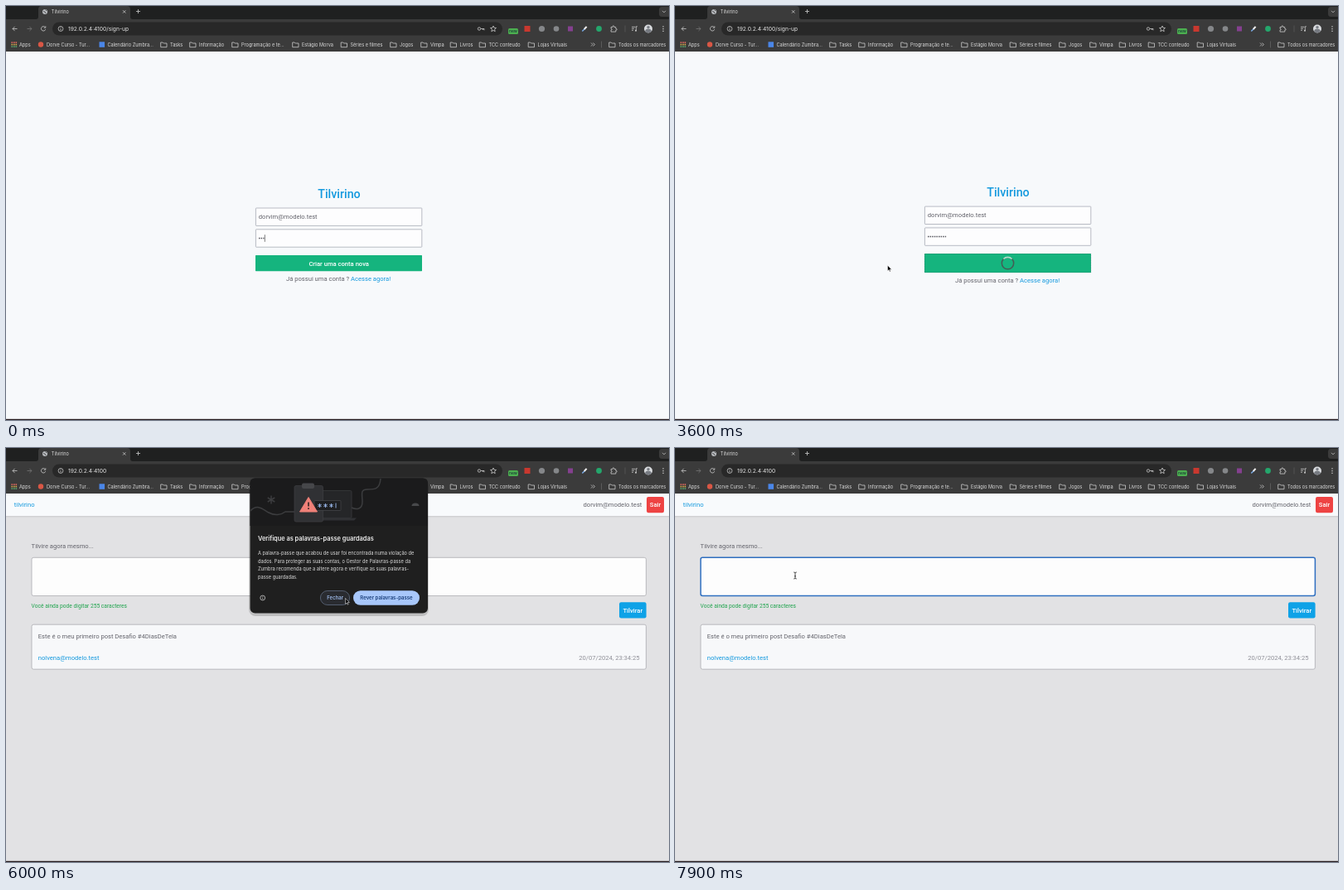
Write an HTML page that moves like this. It is 800 by 500 pixels and loops after 8 s.

```html
<!DOCTYPE html>
<html lang="pt">
<head>
<meta charset="utf-8">
<title>Tilvirino</title>
<style>
  html, body { margin: 0; width: 100%; height: 100%; overflow: hidden; background: #1f2020; }
  svg { display: block; width: 100vw; height: 100vh; }
  text { font-family: Roboto, sans-serif; font-size: 7.62px; fill: #63636b; }
  .ui { font-family: Inter, sans-serif; font-size: 5.6px; fill: #dcdcdc; }
  .link { fill: #1399de; }
  .white { fill: #fff; font-weight: 500; }
  .mid { text-anchor: middle; }
  .end { text-anchor: end; }
  .title { font-size: 14.29px; font-weight: 500; }
  .line { fill: none; stroke: #c9c9c9; stroke-width: .8; }
  .field { fill: #fdfdfe; stroke: #a7abb5; stroke-width: .8; }
  .pill { font-size: 6.1px; font-weight: 500; }
</style>
</head>
<body>
<svg viewBox="0 0 800 500" preserveAspectRatio="none">
  <g id="browser">
    <rect width="800" height="56" fill="#1f2020"/>
    <path d="M0 16H36q3 0 3-3V4q0-4 4-4H146q4 0 4 4v9q0 3 3 3H800V56H0z" fill="#3b3b3b"/>
    <circle cx="47" cy="7" r="3" fill="#b9bcc0"/>
    <path d="M45 6.5l2 .5 1 2M47.5 4.5l1.5 1.5" stroke="#3b3b3b" fill="none" stroke-width=".8"/>
    <text class="ui" x="54.8" y="9">Tilvirino</text>
    <path class="line" d="M141 5.2l3.4 3.4m0-3.4l-3.4 3.4M157 6.5h5M159.5 4v5"/>
    <rect x="788" y="1" width="14" height="12" rx="3.5" fill="#3b3b3b"/>
    <path class="line" d="M792 5.8l2 2 2-2"/>
    <rect x="56" y="19.5" width="543" height="16" rx="8" fill="#282828"/>
    <path class="line" d="M13.5 27.5H8m2.6-2.6L8 27.5l2.6 2.6"/>
    <path class="line" d="M25.5 27.5H31m-2.6-2.6l2.6 2.6-2.6 2.6" style="stroke:#777"/>
    <path class="line" d="M47.2 25.6a2.7 2.7 0 1 0 .5 2.6M47.8 24.3v2h-2"/>
    <circle class="line" cx="66" cy="27.5" r="2.9"/>
    <path class="line" d="M66 27.2v2M66 25.4v.8"/>
    <text class="ui" id="address" x="75" y="29.9" style="font-size:6.7px;fill:#e6e6e6"></text>
    <circle class="line" cx="571" cy="27.5" r="1.7"/>
    <path class="line" d="M573 27.5h4v1.8m-1.5-1.8v1.5"/>
    <path class="line" d="M588 24l1 2.3 2.5.2-1.9 1.7.6 2.5-2.2-1.3-2.2 1.3.6-2.5-1.9-1.7 2.5-.2z"/>
    <rect x="606" y="27" width="12" height="7" rx="1.5" fill="#4caf50"/>
    <text class="ui mid" x="612" y="32.3" style="font-size:5px;fill:#123">new</text>
    <rect x="625.5" y="24" width="7" height="7" fill="#c9382f"/>
    <circle cx="646.5" cy="27.5" r="3.6" fill="#85878a"/>
    <circle cx="664" cy="27.5" r="3.3" fill="#85878a"/>
    <rect x="678" y="24.5" width="6" height="6" fill="#84408f"/>
    <path d="M695.3 30.5l3-3" stroke="#7eb0ed" stroke-width="1.4"/>
    <path d="M697.8 28l2.8-3.2" stroke="#eee" stroke-width="2"/>
    <circle cx="715.5" cy="27.5" r="3.4" fill="#24a66c"/>
    <path class="line" d="M730 25.5h2q-.4-1.6.9-1.6t.9 1.6h2v2q1.4-.3 1.4.8t-1.4.8v2H730v-2q1.3 0 1.3-.9t-1.3-.9z"/>
    <path class="line" d="M747 23.5v8" style="stroke:#5a5a5a"/>
    <path class="line" d="M755 25.3h4.5m-4.5 2h3m-3 2h2M760.3 29.8v-5h1.6"/>
    <circle cx="760" cy="29.7" r="1" fill="#c9c9c9"/>
    <circle cx="775" cy="27.5" r="5" fill="#d8dadd"/>
    <path d="M771 30.5q.7-3 4-3t4 3q-4 4-8 0z" fill="#777b82"/>
    <circle cx="775" cy="25.6" r="1.7" fill="#777b82"/>
    <path d="M793 24.3v7" stroke="#ccc" stroke-width="1.3" stroke-dasharray="1.3 1.4"/>
    <circle cx="42" cy="46.5" r="3.2" fill="#d95745"/>
    <rect x="112.5" y="43.3" width="6.5" height="6.5" fill="#4a86e8"/>
    <path class="line" d="M718.500 42.500v8" style="stroke:#626262"/>
  </g>

  <g id="login">
    <rect y="55" width="800" height="445" fill="#f7f9fb"/>
    <g id="fields">
      <text class="link title mid" x="402" y="232">Tilvirino</text>
      <rect class="field" x="301.4" y="244" width="200.4" height="21.4" rx=".6"/>
      <text x="304.800" y="257.300">dorvim@modelo.test</text>
      <rect class="field" x="301.4" y="269.800" width="200.4" height="21.4" rx=".6"/>
      <path id="dots" stroke="#55555c" stroke-width="1.5" stroke-dasharray="1.500 1.1"/>
      <path id="caret" stroke="#444" stroke-width=".7"/>
    </g>
    <rect id="submit" x="301" width="201" rx=".6" fill="#15b47e"/>
    <text class="white mid" id="label" x="401.700" y="313.500">Criar uma conta nova</text>
    <g id="loading" fill="none">
      <rect x="301.300" y="299.400" width="200.400" height="22.400" stroke="#38766a" stroke-width=".6" stroke-dasharray="1 1"/>
      <circle cx="401.500" cy="310.600" r="7.200" stroke="#455b55" stroke-width="1.500"/>
      <path id="spinner" d="M396.400 305.500a7.200 7.200 0 0 1 10.200 0" stroke="#aedfca" stroke-width="1.600"/>
    </g>
    <text id="footer" x="338" y="332.300">Já possui uma conta ? <tspan class="link">Acesse agora!</tspan></text>
  </g>

  <g id="home">
    <rect y="55" width="800" height="445" fill="#e2e2e4"/>
    <rect y="82" width="800" height="1" fill="#d0d0d3"/>
    <rect y="83" width="800" height="1.200" fill="#dadadc"/>
    <rect y="55" width="800" height="27" fill="#f8fafc"/>
    <text class="link" x="9.800" y="71.400">tilvirino</text>
    <text class="end" x="767.300" y="71.400">dorvim@modelo.test</text>
    <rect x="773" y="59" width="21" height="19.200" rx="2.200" fill="#ee4343"/>
    <text class="white mid" x="783.500" y="71.400">Sair</text>
    <text x="30.600" y="121">Tilvire agora mesmo...</text>
    <rect id="post" x="31" y="132.300" width="741.400" height="46.200" rx="2.200" fill="#fdfdfd"/>
    <text x="30.600" y="193" style="font-size:6.67px;fill:#20a44e">Você ainda pode digitar 255 caracteres</text>
    <rect x="740" y="186.300" width="32.600" height="19.200" rx="2.200" fill="#0ea2e7"/>
    <text class="white mid" x="756.300" y="198.600">Tilvirar</text>
    <rect x="31" y="213.200" width="741.400" height="54" rx="2.200" fill="#f7f8fa" stroke="#acacb1" stroke-width=".8"/>
    <text x="38.800" y="229.600">Este é o meu primeiro post Desafio #4DiasDeTela</text>
    <text class="link" x="38.800" y="256.300">nolvena@modelo.test</text>
    <text class="end" x="764.500" y="256.300" style="fill:#8f8f97">20/07/2024, 23:34:25</text>
  </g>

  <g id="popup">
    <rect x="293" y="38" width="217" height="165" rx="8" opacity=".16"/>
    <rect x="294.500" y="36.500" width="214.500" height="163" rx="6" fill="#1f1f1f"/>
    <path d="M294.500 94V42.500q0-6 6-6H503q6 0 6 6V94z" fill="#1b1b1c"/>
    <g fill="none" stroke="#3c3d3f" stroke-width="1.500">
      <path d="M295 76c8-9 15-2 22 2s15 3 20-1h11M417 72c6 3 13 2 13-7s-3-15 6-15 15 0 16-13"/>
      <path d="M320 57.500v10m-4.300-7.500l8.600 5m0-5l-8.600 5"/>
    </g>
    <path d="M489.500 70q0-3.500 4.500-3.500t4.500 3.500z" fill="#48494b"/>
    <rect x="370" y="51.500" width="47" height="33" rx="1.500" fill="#252628" stroke="#3d3e40" stroke-width=".7"/>
    <path d="M365 84.500h58l-3 3h-52z" fill="#303134"/>
    <rect x="348" y="45.500" width="34.500" height="43.500" rx="2" fill="#303134" stroke="#3f4043" stroke-width=".7"/>
    <rect x="357" y="42.500" width="15" height="6.500" rx="2" fill="#46474a"/>
    <rect x="372" y="63.500" width="32" height="12" rx="1" fill="#1d1e20" stroke="#48494c" stroke-width=".7"/>
    <g stroke="#9dbdf2" stroke-width=".9">
      <path id="stars"/>
      <path d="M398 66.500v6"/>
    </g>
    <path d="M365 59.500l10.500 17.500h-21z" fill="#ef8078" stroke="#ef8078" stroke-linejoin="round"/>
    <path d="M365 65.500v5m0 1.800v1.600" stroke="#332423" stroke-width="1.600"/>
    <text class="ui" x="304" y="112" style="font-size:7.4px;font-weight:600;fill:#eee">Verifique as palavras-passe guardadas</text>
    <g id="advice"></g>
    <circle class="line" cx="309.700" cy="181" r="2.900"/>
    <path class="line" d="M309.700 180.600v2m0-3.700v.8"/>
    <rect id="close" x="379.400" y="172.500" width="35.200" height="17" rx="8.500" stroke="#66758d" stroke-width=".7"/>
    <text class="ui pill mid" x="397.200" y="183.200" style="fill:#a8c7fa">Fechar</text>
    <rect x="419" y="172.300" width="80" height="17.400" rx="8.700" fill="#a8c7fa"/>
    <text class="ui pill mid" x="459" y="183.200" style="fill:#0b306d">Rever palavras-passe</text>
  </g>

  <rect y="498.800" width="800" height="1.200" fill="#241a1d"/>
  <g id="cursor">
    <path id="arrow" d="M0 0v6.900l1.600-1.500 1 2.300 1.100-.5-1-2.200h2.200z" fill="#000" stroke="#fff" stroke-width=".5"/>
    <path id="beam" d="M-1.800-4q1.800 0 1.800 1V3q0 1-1.800 1M1.800-4Q0-4 0-3M0 3q0 1 1.800 1M-1 .8h2" fill="none" stroke="#222" stroke-width=".8"/>
  </g>
</svg>
<script>
const $ = id => document.getElementById(id);
const set = (id, attrs) => Object.entries(attrs).forEach(([k, v]) => $(id).setAttribute(k, v));
const show = (id, on) => { $(id).style.display = on ? '' : 'none'; };
const clamp = v => Math.max(0, Math.min(1, v));

function add(parent, tag, attrs, text = '') {
  const el = document.createElementNS('http://www.w3.org/2000/svg', tag);
  for (const k in attrs) el.setAttribute(k, attrs[k]);
  el.textContent = text;
  $(parent).append(el);
}

// Bookmarks: text position, label, folder icon or not
const bookmarks = [
  [16, 'Apps'], [49, 'Dorve Curso - Tur...'], [122.5, 'Calendário Zumbra...'],
  [198, 'Tasks', 1], [233, 'Informação', 1], [284, 'Programação e te...', 1],
  [357, 'Estágio Morva', 1], [415.5, 'Séries e filmes', 1], [475, 'Jogos', 1],
  [512, 'Vimpa', 1], [547.5, 'Livros', 1], [582.5, 'TCC conteudo', 1],
  [641.5, 'Lojas Virtuais', 1], [739, 'Todos os marcadores', 1]
];
for (const [x, label, folder] of bookmarks) {
  add('browser', 'text', { class: 'ui', x, y: 48.6 }, label);
  if (folder) add('browser', 'path', { class: 'line', d: `M${x - 11.3} 44h2.500l1 1h3.800v4.700h-7.300z` });
}
add('browser', 'path', { class: 'line', d: 'M706 44.500l2 2-2 2m2.500-4l2 2-2 2' });
const appColors = ['#e0695f', '#d9ad4c', '#5aa56d'];
for (let i = 0; i < 9; i++)
  add('browser', 'rect', { x: 6.5 + i % 3 * 2.5, y: 43.3 + (i / 3 | 0) * 2.5, width: 1.6, height: 1.6, fill: appColors[i / 3 | 0] });

[
  'A palavra-passe que acabou de usar foi encontrada numa violação de',
  'dados. Para proteger as suas contas, o Gestor de Palavras-passe da',
  'Zumbra recomenda que a altere agora e verifique as suas palavras-',
  'passe guardadas.'
].forEach((line, i) =>
  add('advice', 'text', { class: 'ui', x: 304, y: 129.3 + i * 9.55, style: 'font-size:5.69px' }, line));

set('stars', { d: [378.5, 385.5, 392.5].map(x => `M${x} 67v5m-2.200-3.800l4.400 2.600m0-2.600l-4.400 2.600`).join('') });

const keyTimes = [100, 400, 700, 1000, 1400, 1600];
const path = [
  [3200, 256.5, 313.2], [4000, 256.5, 313.2], [4300, 298, 292], [4500, 298, 292],
  [5500, 409.5, 181.5], [6300, 409.5, 181.5], [6600, 399.2, 181.8], [6700, 399.2, 181.8],
  [7100, 162.5, 178], [7200, 150, 164.5], [7300, 150, 164.5], [7400, 145, 154]
];

function cursorAt(t) {
  const i = path.findIndex(p => p[0] > t);
  if (i < 0) return path[path.length - 1].slice(1);
  const [t0, x0, y0] = path[Math.max(0, i - 1)], [t1, x1, y1] = path[i];
  const k = clamp((t - t0) / (t1 - t0)), e = k * k * (3 - 2 * k);
  return [x0 + (x1 - x0) * e, y0 + (y1 - y0) * e];
}

function draw(t) {
  const home = t >= 3700, loading = t >= 2000;
  show('login', !home);
  show('home', home);
  $('address').textContent = '192.0.2.4:4100' + (home ? '' : '/sign-up');

  const end = 304.5 + 2.6 * (3 + keyTimes.filter(k => k <= t).length);
  set('dots', { d: `M305 280.500H${end - .8}` });
  set('caret', { d: `M${end} 276.200v8.600` });
  show('caret', !loading);
  set('fields', { transform: `translate(0 ${loading ? -1.9 : 0})` });
  set('footer', { transform: `translate(0 ${loading ? 1.9 : 0})` });
  set('submit', { y: loading ? 299.1 : 301, height: loading ? 23 : 19.2 });
  show('label', !loading);
  show('loading', loading);
  set('spinner', { transform: `rotate(${(t - 3600) * .36} 401.500 310.600)` });

  const focused = t >= 7400;
  set('post', { stroke: focused ? '#2f6fc0' : '#acacb1', 'stroke-width': focused ? 1.5 : .8 });

  const opacity = clamp((t - 4600) / 200) * clamp((6500 - t) / 200);
  show('popup', opacity > 0);
  set('popup', { opacity, transform: `translate(0 ${-4 * clamp((4800 - t) / 200)})` });
  set('close', { fill: t >= 5400 ? '#292b30' : '#1f1f1f' });

  const beam = t >= 7100;
  show('cursor', t >= 3200);
  show('arrow', !beam);
  show('beam', beam);
  set('cursor', { transform: `translate(${cursorAt(t)})` });
}

function tick() {
  draw(Math.floor(performance.now() % 8000 / 100) * 100);
  requestAnimationFrame(tick);
}
tick();
</script>
</body>
</html>
```
